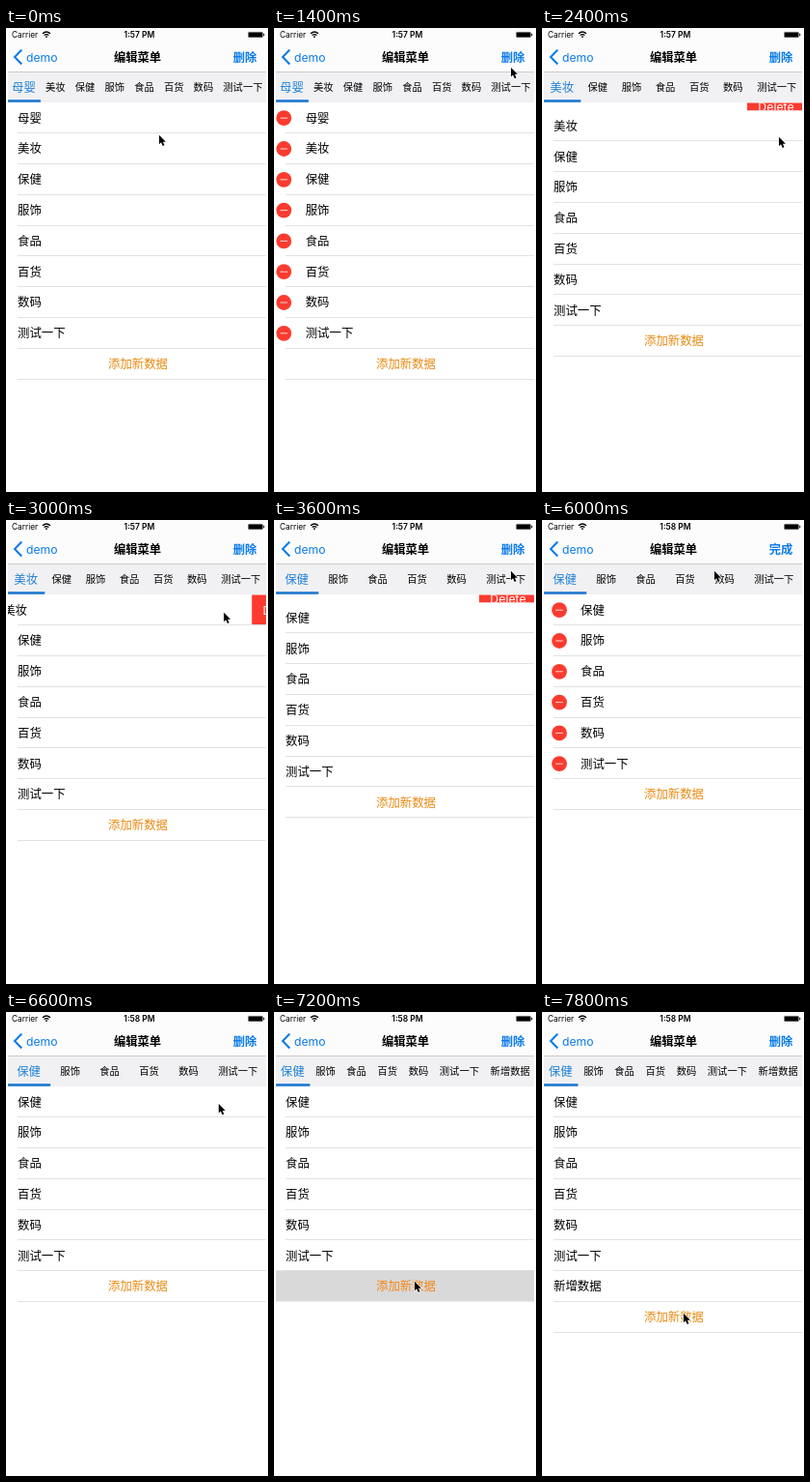
An HTML page for the animation above (8000 ms loop, 272 px wide and 480 px high).

```html
<!DOCTYPE html>
<html lang="zh-CN">
<head>
<meta charset="utf-8">
<title>编辑菜单</title>
<style>
  html, body { margin: 0; width: 100%; height: 100%; overflow: hidden; background: #fff; }
  svg { display: block; }
  #stage { width: 100vw; height: 100vh; }
  text { font-family: Inter, "Noto Sans CJK SC", "Noto Sans CJK", sans-serif; white-space: pre; }
</style>
</head>
<body>
<svg id="stage" viewBox="0 0 272 480"></svg>
<script>
const LOOP = 8000, STEP = 200, SLIDE = 300;
const LEFT = 2, RIGHT = 270, WIDTH = RIGHT - LEFT, TOP = 77.3, ROW = 31.8, BUTTON = 57;
const BLUE = '#0b7be8', ORANGE = '#e88a12', RED = '#fb3b2f';

const items = [
  { name: '母婴', swipe: 1700, removed: 2200 },
  { name: '美妆', swipe: 2900, removed: 3400 },
  ...['保健', '服饰', '食品', '百货', '数码', '测试一下'].map(name => ({ name })),
  { name: '新增数据', added: 7200 }
];
const toggles = [700, 1300, 3900, 4900, 5500, 6300];

// the pointer visits every control when it is used, and rests in between
const visit = (time, x, y) => ({ time, x, y });
const visits = [
  visit(0, 158, 110), visit(2400, 245, 112), visit(3600, 245, 52), visit(4400, 228, 127),
  visit(6000, 178, 52), visit(7200, 145, 278), visit(7800, 146, 311),
  ...toggles.map(time => visit(time, 246, 30)),
  ...items.filter(i => i.swipe).flatMap(i => [
    visit(i.swipe, 240, 95), visit(i.swipe + SLIDE, 240 - BUTTON, 95), visit(i.removed, 243, 92)
  ])
].sort((a, b) => a.time - b.time);

const ease = u => { u = Math.min(1, Math.max(0, u)); return u * u * (3 - 2 * u); };
const ramp = (t, start) => ease((t - start) / SLIDE);
const mix = (a, b, u) => a + (b - a) * u;

const rect = (x, y, w, h, fill, extra = '') =>
  `<rect x="${x}" y="${y}" width="${w}" height="${h}" fill="${fill}" ${extra}/>`;
// y is the visual middle of the glyphs
const label = (s, x, y, size, fill = '#000', anchor = 'start', weight = 400) =>
  `<text x="${x}" y="${y + size * 0.375}" font-size="${size}" fill="${fill}" text-anchor="${anchor}" font-weight="${weight}">${s}</text>`;
const separator = y => rect(12, Math.round(y) - 1, RIGHT - 12, 1, '#e2e2e4');

function header(t, editing) {
  return rect(LEFT, 0, WIDTH, 46, '#fcfcfc') + rect(LEFT, 45, WIDTH, 1, '#cacacc') +
    label('Carrier', 6, 7, 8.3) +
    `<g fill="none" stroke="#000" stroke-width="1.3"><path d="M38 5.8q4-3.6 8 0M39.6 7.6q2.4-2 4.8 0"/></g>
     <path d="M40.8 8.8q1.2-.9 2.4 0l-1.2 1.6z"/>` +
    label(`1:5${t < 3800 ? 7 : 8} PM`, 138.5, 7, 8.5, '#000', 'middle', 600) +
    rect(251.5, 4.3, 15, 5.4, '#000', 'rx="1" stroke="#888" stroke-width=".6"') +
    rect(267.2, 5.8, 1, 2.4, '#000') +
    `<path d="M16.3 22.5L9 30l7.3 7.5" fill="none" stroke="${BLUE}" stroke-width="2"/>` +
    label('demo', 21, 30, 12.2, BLUE) +
    label('编辑菜单', 136.5, 30, 12.3, '#000', 'middle', 600) +
    label(editing ? '完成' : '删除', 260.3, 30, 12.3, BLUE, 'end', 600);
}

function tabs(t) {
  const shown = items.filter(i => !(t >= i.removed) && !(t < i.added));
  const sizes = shown.map((_, i) => i ? 10.3 : 12.4);
  const widths = shown.map((item, i) => item.name.length * sizes[i]);
  const gap = (WIDTH + 2.6 - widths.reduce((a, b) => a + b)) / shown.length;
  let x = 1 + gap / 2;
  let out = rect(LEFT, 46, WIDTH, 31, '#f1f1f3');
  shown.forEach((item, i) => {
    out += label(item.name, x, 61.5, sizes[i], i ? '#000' : '#1f80d6');
    x += widths[i] + gap;
  });
  return out + rect(LEFT, 74.2, widths[0] + gap - 1, 2.6, '#1f78d0');
}

function row(item, y, h, t, edit) {
  const slide = item.swipe ? -BUTTON * ramp(t, item.swipe) : 0;
  const middle = ROW / 2;
  const minus = `<g transform="translate(${mix(-14, 16, edit) + slide} ${middle})">` +
    `<circle r="7.9" fill="${RED}"/>${rect(-3.8, -0.5, 7.6, 1, '#ffd9d6')}</g>`;
  const button = rect(WIDTH + slide, 0, BUTTON, h, RED) +
    label('Delete', WIDTH + 30 + slide, h / 2 + 0.3, 12.3, '#fff', 'middle');
  return `<svg x="${LEFT}" y="${y}" width="${WIDTH}" height="${h}">` +
    label(item.name, mix(10, 38, edit) + slide, middle - 0.2, 12.4) + minus + button + '</svg>' +
    (h > ROW / 2 ? separator(y + h) : '');
}

function list(t, edit) {
  let y = TOP, out = '';
  for (const item of items) {
    const size = item.removed ? 1 - ramp(t, item.removed) : item.added ? ramp(t, item.added) : 1;
    if (size <= 0) continue;
    out += row(item, y, ROW * size, t, edit);
    y += ROW * size;
  }
  const pressed = t >= 7100 && t < 7300;
  return out + (pressed ? rect(LEFT, y - 0.8, WIDTH, ROW + 0.4, '#d9d9d9') : separator(y + ROW)) +
    label('添加新数据', 137, y + ROW / 2 - 0.2, 12.4, pressed ? '#f58512' : ORANGE, 'middle');
}

function cursor(t) {
  const a = visits.findLast(v => v.time <= t);
  const b = visits.find(v => v.time > t) || a;
  const u = a === b ? 0 : ease((t - a.time) / (b.time - a.time));
  return `<path transform="translate(${mix(a.x, b.x, u) + 0.5} ${mix(a.y, b.y, u) + 0.3}) scale(.92)"
    d="M.5 .5V10.8L2.8 8.7 4.6 12.8 6.5 12 4.8 8H8z" stroke="#fff" stroke-width="1.4" paint-order="stroke"/>`;
}

const stage = document.getElementById('stage');
let last = -1;

function draw(now) {
  const t = Math.floor(now % LOOP / STEP) * STEP;
  if (t !== last) {
    last = t;
    const editing = toggles.filter(time => time <= t).length % 2 === 1;
    const edit = toggles.reduce((sum, time, i) => sum + (i % 2 ? -1 : 1) * ramp(t, time), 0);
    stage.innerHTML = list(t, edit) + header(t, editing) + tabs(t) + cursor(t);
  }
  requestAnimationFrame(draw);
}
draw(performance.now());
</script>
</body>
</html>
```
